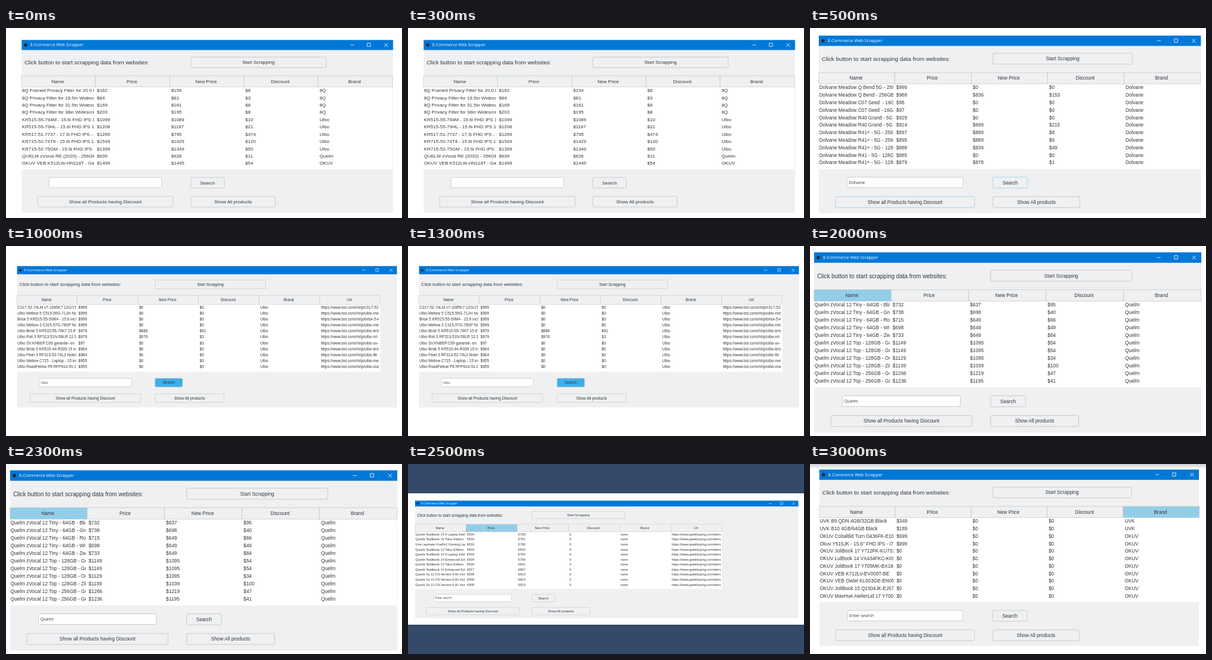
Animation, 676 px wide and 324 px high, one loop 3500 ms. Source, as an HTML page:

```html
<!DOCTYPE html>
<html lang="en">
<meta charset="utf-8">
<title>E-Commerce Web Scrapper</title>
<style>
html, body { margin: 0; width: 100%; height: 100%; overflow: hidden; background: #fff; }
#stage { display: block; width: 676px; height: 324px; }
text { font: 13px "Liberation Sans", Arial, sans-serif; fill: #31363b; white-space: pre; }
.mid { text-anchor: middle; }
.label { font-size: 15.5px; }
.title { font: 11.45px "Open Sans", sans-serif; fill: #fff; }
.entry { font: 11.4px "Open Sans", sans-serif; }
.line { fill: none; stroke: #fff; stroke-width: 1.3; }
</style>
<svg id="stage" viewBox="0 0 676 324">
  <defs>
    <linearGradient id="shade" x2="0" y2="1">
      <stop stop-color="#cfcfcf"/><stop offset="1" stop-color="#fff"/>
    </linearGradient>
  </defs>
</svg>
<script>
const STEP = 500, COL = 204, ROW = 20;
const PANEL = '#eff0f1', EDGE = '#bcbebf', HOVER = '#93cee9', PRESSED = '#3daee9';
const HEADERS = ['Name', 'Price', 'New Price', 'Discount', 'Brand', 'Url'];
const SHOW_DISCOUNT = 'Show all Products having Discount';
const BOL = 'https://www.bol.com//nl/p/', GEEK = 'https://www.geekbuying.com/item/';

// Each scene is one window: position, scale, size in window units, and its table.
const scenes = [
  { x: 26.7, y: 19.5, scale: .621, width: 1021, height: 476, rows: `
8Q Framed Privacy Filter for 20.0 inch|$162|$154|$8|8Q
8Q Privacy Filter for 19.5in Widescreen|$84|$81|$3|8Q
8Q Privacy Filter for 31.5in Widescreen|$169|$161|$8|8Q
8Q Privacy Filter for 38in Widescreen|$203|$195|$8|8Q
KR515-55-794M - 15.6i FHD IPS 144|$1099|$1089|$10|Ulbo
KR515-55-79HL - 15.6i FHD IPS 144|$1208|$1187|$21|Ulbo
KR517-51-7737 - 17.3i FHD IPS - i7|$1269|$795|$474|Ulbo
KR715-52-74T8 - 15.6i FHD IPS 144|$1549|$1429|$120|Ulbo
KR715-52-75GM - 15.6i FHD IPS 144|$1399|$1349|$50|Ulbo
QUELM zVocal RE (2020) - 256GB|$639|$628|$11|Quelm
OKUV VEB K512LW-HN118T - Game|$1499|$1445|$54|OKUV` },

  { x: 15, y: 12, scale: .6395, width: 1020, height: 475, entry: 'Dolvane',
    edges: { Search: HOVER, [SHOW_DISCOUNT]: HOVER }, rows: `
Dolvane Meadow Q Bend 5G - 256GB|$999|$0|$0|Dolvane
Dolvane Meadow Q Bend - 256GB - Z|$989|$836|$153|Dolvane
Dolvane Meadow C07 Seed  - 16GB|$98|$0|$0|Dolvane
Dolvane Meadow C07 Seed - 16GB|$97|$0|$0|Dolvane
Dolvane Meadow R40 Grand - 5G - 1|$929|$0|$0|Dolvane
Dolvane Meadow R40 Grand - 5G - 1|$914|$699|$215|Dolvane
Dolvane Meadow R41+ - 5G - 256GB|$897|$889|$8|Dolvane
Dolvane Meadow R41+ - 5G - 256GB|$895|$889|$6|Dolvane
Dolvane Meadow R41+ - 5G - 128GB|$888|$839|$49|Dolvane
Dolvane Meadow R41 - 5G - 128GB|$885|$0|$0|Dolvane
Dolvane Meadow R41+ - 5G - 128GB|$879|$878|$1|Dolvane` },

  { x: 18.8, y: 33.5, scale: .507, width: 1279, height: 477, entry: 'Ulbo', columns: 6,
    fills: { Search: PRESSED }, rows: `
C317-52-74LM v7-1065K7 12G/1TB|$999|$0|$0|Ulbo|${BOL}c317-52
Ulbo Mellow 5 C515-56G-71JH Notebook|$999|$0|$0|Ulbo|${BOL}ulbo-mel
Brisk 5 KR515-55-50M4 - 15.6 inch|$999|$0|$0|Ulbo|${BOL}brisk-5-k
Ulbo Mellow 3 C315-57G-78SP Notebook|$999|$0|$0|Ulbo|${BOL}ulbo-mel
Ulbo Brisk 5 KR515-55-74K7 15.6" FHD|$979|$888|$91|Ulbo|${BOL}ulbo-bris
Ulbo Roll 3 RP313-51N-58LR 13.3 inch|$979|$976|$3|Ulbo|${BOL}ulbo-rol
Ulbo SV.KNBEP.C09 garantie- en|$97|$0|$0|Ulbo|${BOL}ulbo-sv-
Ulbo Brisk 5 KR515-44-R339 15 inch|$964|$0|$0|Ulbo|${BOL}ulbo-bris
Ulbo Fleet 3 RF313-52-70L2 Notebook|$964|$0|$0|Ulbo|${BOL}ulbo-fle
Ulbo Mellow C715 - Laptop - 15 inch|$955|$0|$0|Ulbo|${BOL}ulbo-mel
Ulbo RoadFellow P6 RFP614-51-G2|$955|$0|$0|Ulbo|${BOL}ulbo-road` },

  { x: 14.7, y: 18.9, scale: .6345, width: 1018, height: 468,
    fills: { [SHOW_DISCOUNT]: HOVER }, rows: `
Dorvek Planlid B540 81XK007KM|$999|$606|$393|Dorvek
ZQ Worklid 450 K7 15.6 FHD v5-10|$999|$969|$30|ZQ
Dorvek PonderLid B590 Notebook (20|$999|$969|$30|Dorvek
Quelm zVocal 12 - 256GB - Zwart|$999|$998|$1|Quelm
Quelm zVocal Vr Top - 512GB - Silver|$999|$790|$209|Quelm
Quelm zVocal 12 - 256GB - Rood|$999|$969|$30|Quelm
Una Lapmate Una Fit 3B Bend Pocket|$999|$899|$100|none
Quorbi Tealibook 14 Enhanced Edition|$999|$909|$90|none
TOLVEK Merit 30 Max+ CN Version|$999|$879|$120|none
Quorbi Vu 11 CN Version 6.81 Inch|$999|$899|$100|none
Quorbi Vu 11 CN Version 6.81 Inch|$999|$899|$100|none` },

  { x: 7, y: 9.8, scale: .648, width: 1020, height: 476, entry: 'Quelm',
    fills: { Name: HOVER }, rows: `
Quelm zVocal 12 Tiny - 64GB - Black|$732|$637|$95|Quelm
Quelm zVocal 12 Tiny - 64GB - Groen|$738|$698|$40|Quelm
Quelm zVocal 12 Tiny - 64GB - Rood|$715|$649|$66|Quelm
Quelm zVocal 12 Tiny - 64GB - Wit|$698|$649|$49|Quelm
Quelm zVocal 12 Tiny - 64GB - Zwart|$733|$649|$84|Quelm
Quelm zVocal 12 Top - 128GB - Goud|$1149|$1095|$54|Quelm
Quelm zVocal 12 Top - 128GB - Grijs|$1149|$1095|$54|Quelm
Quelm zVocal 12 Top - 128GB - Oceaan|$1129|$1095|$34|Quelm
Quelm zVocal 12 Top - 128GB - Zilver|$1139|$1039|$100|Quelm
Quelm zVocal 12 Top - 256GB - Goud|$1266|$1219|$47|Quelm
Quelm zVocal 12 Top - 256GB - Grijs|$1236|$1195|$41|Quelm` },

  { x: 12, y: 60, scale: .4285, width: 1527, height: 474, top: 6, entry: 'Enter search', columns: 6,
    fills: { Price: HOVER },
    backdrop: '<path fill="#344a68" d="M0 0H676V50H0ZM0 274H676V324H0Z"/>', rows: `
Quorbi Tealibook 14 II Laptop Intel|€934|€790|0|none|${GEEK}
Quorbi Tealibook 16 Talux Edition|€934|€781|0|none|${GEEK}
Una Lapmate UnaRv1 Gaming Laptop|€934|€790|0|none|${GEEK}
Quorbi Tealibook 13 Talux Edition|€934|€832|0|none|${GEEK}
Quorbi Tealibook 14 II Laptop Intel|€934|€764|0|none|${GEEK}
Quorbi Tealibook 14 Enhanced Edition|€934|€790|0|none|${GEEK}
Quorbi Tealibook 13 Talux Edition|€934|€841|0|none|${GEEK}
Quorbi Tealibook 14 Enhanced Edition|€917|€807|0|none|${GEEK}
Quorbi Vu 11 CN Version 6.81 Inch|€909|€815|0|none|${GEEK}
Quorbi Vu 11 CN Version 6.81 Inch|€909|€815|0|none|${GEEK}
Quorbi Vu 11 CN Version 6.81 Inch|€909|€815|0|none|${GEEK}` },

  { x: 16, y: 8.5, scale: .6365, width: 1018, height: 474, entry: 'Enter search',
    fills: { Brand: HOVER },
    backdrop: '<rect width="676" height="9" fill="url(#shade)"/>', rows: `
UVK B9 QDN 4GB/32GB Black|$349|$0|$0|UVK
UVK B10 4GB/64GB Black|$189|$0|$0|UVK
OKUV Cobaltlid Turn D436FK-E10|$999|$0|$0|OKUV
Okuv Y515JK - 15.6" FHD IPS - i7 - 8|$999|$0|$0|OKUV
OKUV JoliBook 17 Y712FK-KU751T|$0|$0|$0|OKUV
OKUV LulBook 14 VX434FKC-KI01|$0|$0|$0|OKUV
OKUV JoliBook 17 Y705MK-BX184|$0|$0|$0|OKUV
OKUV VEB K712LV-EV009T-BE|$0|$0|$0|OKUV
OKUV VEB Owlet KL503GE-EN055|$0|$0|$0|OKUV
OKUV JoliBook 15 Q1504JK-EJ571|$0|$0|$0|OKUV
OKUV MaxHue AtelierLid 17 Y70012|$0|$0|$0|OKUV` },
];

const escape = s => s.replace(/&/g, '&amp;').replace(/</g, '&lt;');
const text = (x, y, s, cls = '') => `<text x="${x}" y="${y}" class="${cls}">${escape(s)}</text>`;
const rect = (x, y, w, h, fill, extra = '') =>
  `<rect x="${x}" y="${y}" width="${w}" height="${h}" fill="${fill}" ${extra}/>`;
const box = (x, y, w, h, fill, edge = EDGE) =>
  rect(x, y, w, h, fill, `rx="3" stroke="${edge}" stroke-width="1.2"`);
const columnLeft = c => c ? c * COL - 1 : 0;

function titleBar({ width: w, top = 1.5 }) {
  const mid = (top + 29) / 2;
  return rect(0, top, w, 29 - top, '#0078d7')
    + `<circle cx="11" cy="${mid}" r="4.5" fill="#1d2a38"/>`
    + text(24, mid + 4, 'E-Commerce Web Scrapper', 'title')
    + `<path class="line" d="M${w - 117} ${mid}h10M${w - 71} ${mid - 5}h9v9h-9z
       M${w - 24} ${mid - 5}l10 10m0-10l-10 10"/>`;
}

function table({ columns = 5, fills = {}, rows }) {
  let out = rect(0, 100, columns * COL - 1, 257, '#fff');
  for (let c = 0; c < columns; c++) {
    const left = columnLeft(c), w = columnLeft(c + 1) - left;
    out += rect(left, 100, w, 30, fills[HEADERS[c]] || PANEL, `stroke="${EDGE}"`)
      + text(left + w / 2 - 2, 119.5, HEADERS[c], 'mid');
  }
  rows.trim().split('\n').forEach((row, r) => row.split('|').forEach((cell, c) => {
    out += `<svg x="${columnLeft(c)}" y="${130 + r * ROW}" width="${COL - 5}" height="${ROW}">`
      + text(c ? 4 : 1, 14.5, cell) + '</svg>';
  }));
  return out;
}

function drawWindow(scene) {
  const { x, y, scale, width, height, entry = '', fills = {}, edges = {}, backdrop = '' } = scene;
  const button = (left, top, w, label) =>
    box(left, top, w, 29, fills[label] || PANEL, edges[label])
    + text(left + w / 2, top + 19, label, 'mid');
  return `<g display="none">${backdrop}<g transform="translate(${x} ${y}) scale(${scale})">`
    + rect(0, 2, width, height - 2, PANEL)
    + titleBar(scene)
    + text(8, 69, 'Click button to start scrapping data from websites:', 'label')
    + button(465, 48.5, 372, 'Start Scrapping')
    + table(scene)
    + box(75, 379, 310, 28, '#fff') + text(80, 397, entry, 'entry')
    + button(465, 379, 92, 'Search')
    + button(44, 431, 372, SHOW_DISCOUNT)
    + button(465, 431, 232, 'Show All products')
    + '</g></g>';
}

const stage = document.getElementById('stage');
stage.insertAdjacentHTML('beforeend', scenes.map(drawWindow).join(''));
const windows = stage.querySelectorAll(':scope > g');

function tick() {
  const current = Math.floor(performance.now() / STEP) % scenes.length;
  windows.forEach((g, i) => g.setAttribute('display', i === current ? 'inline' : 'none'));
  requestAnimationFrame(tick);
}
tick();
</script>
</html>
```
